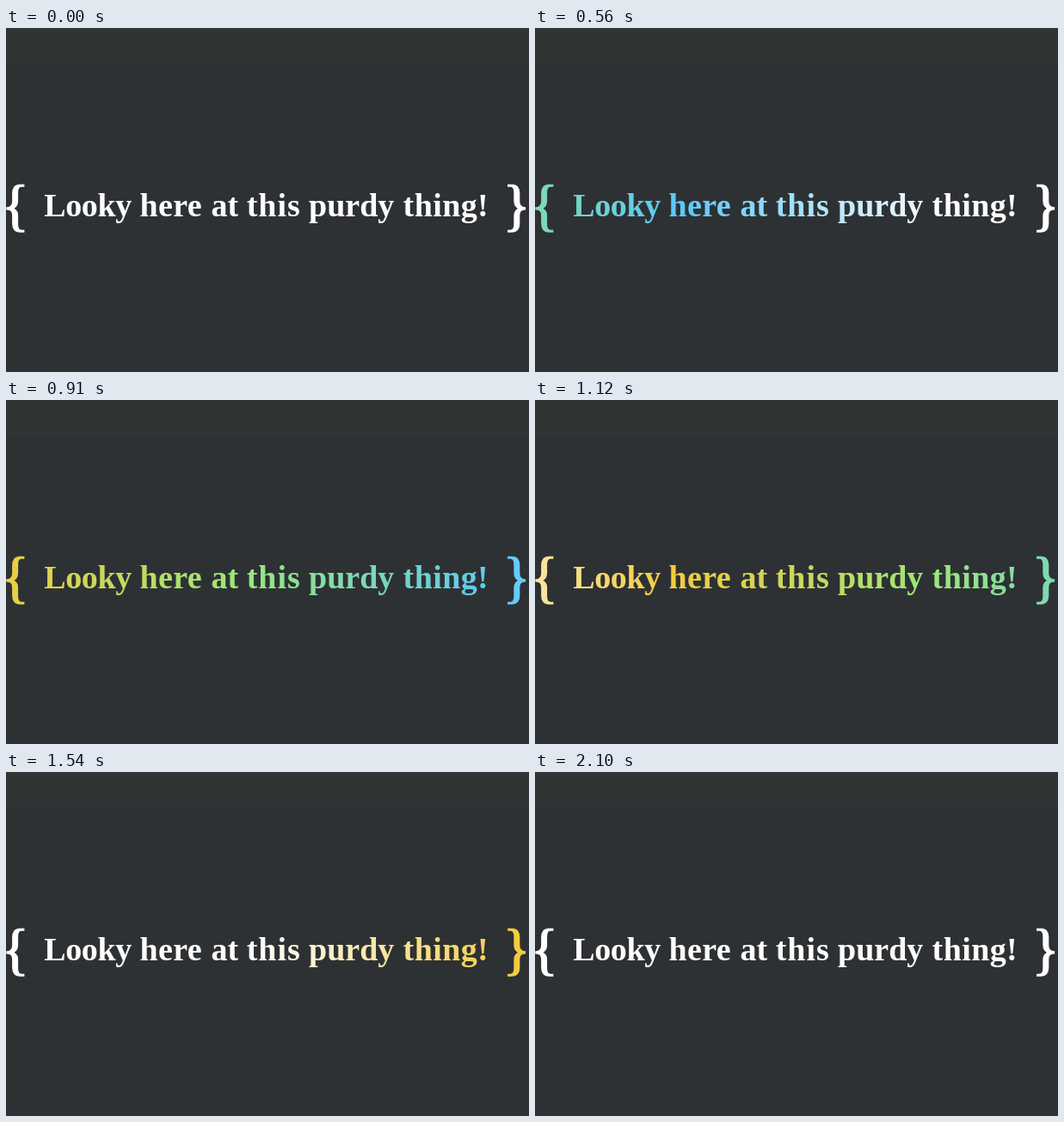
Animation of 608x400 px, one loop 2.66 s. Source, as an HTML page:

```html
<!DOCTYPE html>
<html lang="en">
<head>
<meta charset="utf-8">
<title>Rainbow sweep headline</title>
<style>
  html, body { margin: 0; width: 100%; height: 100%; overflow: hidden; background: #2e3133; }
  svg { display: block; width: 100vw; height: 100vh; }
  text { font-family: "Liberation Serif", "Times New Roman", serif; fill: url(#sweep); }
  .title { font-size: 38px; font-weight: 700; }
  .brace { font-size: 65px; stroke: url(#sweep); stroke-width: 1.7; }
</style>
</head>
<body>
<svg viewBox="0 0 608 400" xmlns="http://www.w3.org/2000/svg">
  <defs>
    <linearGradient id="sweep" gradientUnits="userSpaceOnUse" x1="-1216" y1="0" x2="0" y2="0">
      <stop offset="0" stop-color="#fffdfd"/>
      <stop offset=".25" stop-color="#f4cb3e"/>
      <stop offset=".5" stop-color="#9ae779"/>
      <stop offset=".75" stop-color="#5ac8fa"/>
      <stop offset="1" stop-color="#fffdfd"/>
    </linearGradient>
  </defs>
  <rect width="608" height="400" fill="#2e3133"/>
  <rect width="608" height="42" fill="#303434"/>
  <text class="brace" x="-4.7" y="228.4">{</text>
  <text class="title" y="219.3"><tspan x="44.3" letter-spacing="-.4">Looky</tspan> <tspan x="155.4" letter-spacing=".4">here</tspan> <tspan x="238.4">at</tspan> <tspan x="279.7" letter-spacing="1">this</tspan> <tspan x="352">purdy</tspan> <tspan x="461.6" letter-spacing=".4">thing!</tspan></text>
  <text class="brace" x="578" y="228.4">}</text>
</svg>
<script>
  const LOOP = 2660, STEP = 70, BAND = 1216;
  const sweep = document.getElementById("sweep");

  // [time in ms, x of the leading edge of the colour band]
  const keys = [[210, 0], [420, 295], [700, 645], [910, 880], [1260, 1203],
                [1540, 1508], [1820, 1715], [2100, 1824]];

  function slope(i) {
    const a = keys[Math.max(i - 1, 0)], b = keys[Math.min(i + 1, keys.length - 1)];
    return (b[1] - a[1]) / (b[0] - a[0]);
  }

  // Cubic Hermite curve through the keys
  function edgeAt(t) {
    const last = keys.length - 1;
    if (t <= keys[0][0]) return keys[0][1];
    if (t >= keys[last][0]) return keys[last][1];
    const i = keys.findIndex(k => k[0] > t) - 1;
    const [t0, x0] = keys[i], [t1, x1] = keys[i + 1];
    const d = t1 - t0, u = (t - t0) / d, v = 1 - u;
    return x0 * (1 + 2 * u) * v * v + x1 * u * u * (3 - 2 * u)
         + d * u * v * (slope(i) * v - slope(i + 1) * u);
  }

  function draw(ms) {
    const t = Math.floor((ms % LOOP) / STEP) * STEP;
    const edge = edgeAt(t);
    sweep.setAttribute("x1", edge - BAND);
    sweep.setAttribute("x2", edge);
  }

  const start = performance.now();
  function tick() {
    draw(performance.now() - start);
    requestAnimationFrame(tick);
  }
  tick();
</script>
</body>
</html>
```
